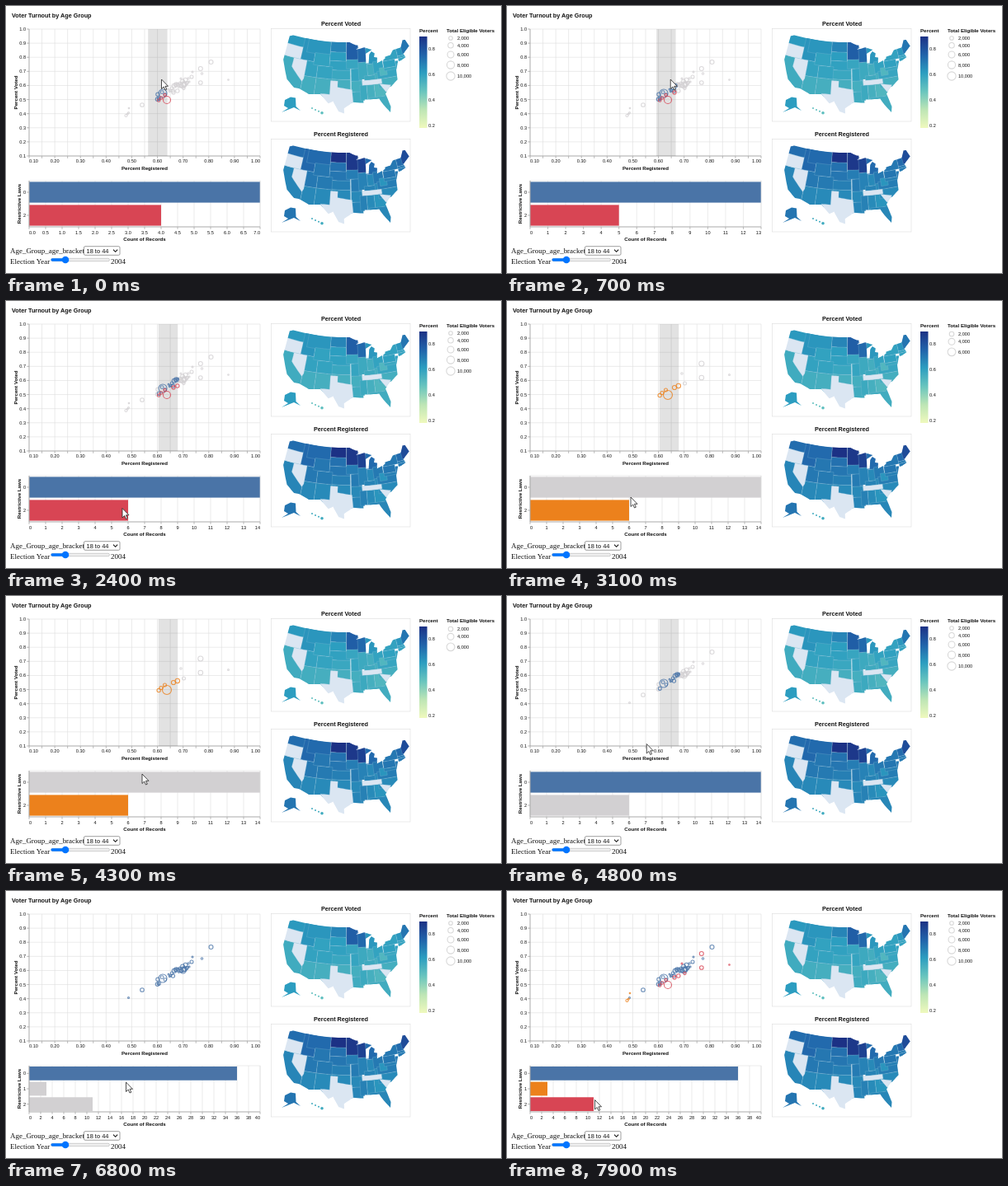
An HTML page that plays this animation: 600 px wide and 324 px high, repeating every 8 s.

```html
<!DOCTYPE html>
<html lang="en">
<head>
<meta charset="utf-8">
<title>Voter Turnout by Age Group</title>
<style>
html, body { margin: 0; width: 100%; height: 100%; overflow: hidden; background: white; }
svg { display: block; font: 5.6px "Liberation Sans", Arial, sans-serif; fill: #111; }
.title { font-size: 6.15px; font-weight: bold; }
.head { font-size: 7.26px; font-weight: bold; }
.form { font: 8.96px "Liberation Serif", Times, serif; }
.grid { stroke: #ddd; stroke-width: .6; fill: none; }
.tick { stroke: #888; stroke-width: .6; fill: none; }
.ring { fill: none; stroke-width: 1.1; }
.state { stroke: #8fbfd6; stroke-width: .25; }
.select { fill: white; stroke: #767676; stroke-width: .7; }
.track { fill: #efefef; stroke: #b2b2b2; stroke-width: .6; }
.chevron { fill: none; stroke: #111; stroke-width: 1.1; }
.brush { fill: #333; fill-opacity: .14; }
#cursor { fill: white; stroke: #222; stroke-width: .8; }
</style>
</head>
<body>
<svg id="stage" width="600" height="324" viewBox="0 0 600 324">
  <defs>
    <linearGradient id="ramp" x1="0" y1="1" x2="0" y2="0"></linearGradient>
    <clipPath id="country"><path id="coast"/></clipPath>
  </defs>
  <g id="fixed"></g>
  <g id="live"></g>
  <path id="cursor" d="M0 0V11.5L2.7 9 4.5 13 6.3 12.2 4.5 8.3H8Z"/>
</svg>
<script>
const $ = id => document.getElementById(id);
const LOOP = 8000, LEFT = 28, WIDTH = 280, TOP = 28, BOTTOM = 182, BARS = 212, BAR_HEIGHT = 56, BRUSH = 23.4;
const BLUE = '#4a74a7', ORANGE = '#ec811c', RED = '#d84554', GRAY = '#d2d0d2';

// ---- markup helpers
const text = (s, x, y, anchor = 'middle', cls = '', extra = '') =>
  `<text x="${x}" y="${y}" text-anchor="${anchor}" class="${cls}" ${extra}>${s}</text>`;
const upright = (s, x, y) => text(s, 0, 0, 'middle', 'title', `transform="translate(${x} ${y}) rotate(-90)"`);
const line = (d, cls) => `<path d="${d}" class="${cls}"/>`;
const rect = (x, y, w, h, attrs) => `<rect x="${x}" y="${y}" width="${w}" height="${h}" ${attrs}/>`;
const dot = (x, y, r, attrs) => `<circle cx="${x}" cy="${y}" r="${r}" ${attrs}/>`;
const flush = x => x <= LEFT + .1 ? 'start' : x >= LEFT + WIDTH - .1 ? 'end' : 'middle';

// ---- colour ramp
const ramp = [[239, 249, 189], [189, 229, 181], [105, 197, 190], [44, 158, 192], [33, 99, 170], [28, 49, 133]];
function shade(value) {
  const p = Math.max(0, Math.min(4.99, (value - .18) / .73 * 5)), i = Math.floor(p);
  return `rgb(${ramp[i].map((c, k) => Math.round(c + (ramp[i + 1][k] - c) * (p - i)))})`;
}
$('ramp').innerHTML = ramp.map((c, i) => `<stop offset="${i * 20}%" stop-color="rgb(${c})"/>`).join('');

// ---- map: Albers projection of longitude/latitude outlines
function project(lon, lat) {
  const n = .60285, rad = Math.PI / 180;
  const rho = Math.sqrt(1.35123 - 2 * n * Math.sin(lat * rad)) / n, a = n * (lon + 96) * rad;
  return [414 + 212 * rho * Math.sin(a), 83 - 212 * (1.28208 - rho * Math.cos(a))];
}
function outline(c) {
  const points = [], steps = 5;
  for (let i = 0; i < c.length; i += 2) {
    const j = (i + 2) % c.length;
    for (let k = 0; k < steps; k++) {
      const mix = m => c[i + m] + (c[j + m] - c[i + m]) * k / steps;
      points.push(project(mix(0), mix(1)).map(v => v.toFixed(1)).join(' '));
    }
  }
  return `M${points.join('L')}Z`;
}
const north = [-124.7,48.4, -123,49, -95,49.2, -92,48.2, -89.6,48, -92,46.7, -88,47.3, -84.5,46.3, -87.6,45.2,
  -87.8,42, -86.6,42, -86,44.8, -84.8,45.8, -83.4,45, -83.9,43.8, -82.5,43.5, -83,41.6, -79,42.8, -79,43.3,
  -76.4,43.6, -74.8,45, -71,45.2, -69.2,47.4, -68,47.2, -67,44.9];
const south = [-70.6,43, -70,41.7, -74,40.6, -75.3,38.3, -75.6,35.3, -78,33.9, -81.3,31.5, -80.1,27, -80.6,25.2,
  -82.7,28, -84,30.1, -89.5,30.3, -89.5,29.2, -94,29.6, -97.3,27.6, -97.2,25.9, -99.2,26.5, -101.5,29.8,
  -103.2,29, -106.5,31.8, -111,31.3, -114.8,32.5, -117.1,32.5, -120.6,34.6, -124.3,40.4];
$('coast').setAttribute('d', outline([...north, ...south]));

// Turnout rises to the north, apart from a few states; some have no data.
const missing = ['OR', 'NV', 'TX', 'TN', 'SC'];
const turnout = { ND: .68, MN: .78, WI: .75, ME: .72, WV: .53, GA: .53, IN: .56 };
const states = [];
function state(name, ...coords) {
  const lat = coords[1] / 2 + coords[5] / 2;
  const voted = turnout[name] || .57 + Math.max(0, lat - 37) * .007 + .015 * Math.sin(states.length * 2.4);
  const fills = [voted, voted + (name === 'ND' ? .25 : .11)].map(shade);
  states.push({ fills: missing.includes(name) ? ['#dbe6f2', '#dbe6f2'] : fills, d: outline(coords) });
}
// States stacked from south to north between two meridians; later ones cover earlier ones.
function column(names, west, east, ...cuts) {
  names.split(' ').forEach((name, i) =>
    state(name, west, cuts[i], east, cuts[i], east, cuts[i + 1], west, cuts[i + 1]));
}
column('CA OR WA', -125, -114.5, 32, 42, 46, 49.5);
column('ID', -117, -111, 42, 49.2);
column('MT', -115, -104, 44.7, 49.2);
column('AZ UT', -114.5, -109, 31, 37, 42);
column('OK KS NE', -104, -94.8, 33.7, 37, 40, 43);
column('NM CO', -109, -102.5, 31, 37, 41);
column('WY', -111, -104, 41, 45);
column('SD ND', -104, -96.6, 43, 45.9, 49.5);
column('IA MN', -96.5, -91, 40.5, 43.5, 49.5);
column('LA AR MO', -94.5, -90, 29, 33, 36.5, 40.5);
column('IL WI', -91.3, -87.4, 36.9, 42.5, 47.4);
column('MS', -91, -88.3, 30, 35);
column('AL', -88.3, -85.3, 30, 35);
column('GA', -85.3, -80.8, 30.7, 35);
column('FL', -87.6, -79, 24, 30.8);
column('IN MI', -87.5, -82, 38, 41.75, 47);
column('KY OH', -84.8, -80.5, 36.5, 38.5, 42.3);
column('KY', -89, -84.5, 36.5, 38);
column('NC VA', -83.5, -75, 33.5, 36.5, 39);
column('WV', -82.3, -79.3, 37.5, 40);
column('MD PA', -80.3, -75, 38.8, 39.7, 42);
column('NY', -80, -73.4, 42, 45.2);
column('NJ', -75, -73.8, 38.8, 41.3);
column('CT MA VT', -73.4, -69.8, 41, 42, 42.7, 45.4);
column('ME', -71, -66, 43.1, 48);
column('TN', -90, -82, 35, 36.5);
state('SC', -83.2, 35, -78.6, 34, -81, 32);
state('NV', -120, 42, -114, 42, -114, 36, -114.6, 35, -120, 39);
state('TX', -106.6, 32, -103, 32, -103, 36.5, -100, 36.5, -100, 34.5, -94.2, 33.7, -93.8, 29, -97, 25, -104, 28);

function map(title, dy, which) {
  const path = s => `<path d="${s.d}" fill="${s.fills[which]}" class="state"/>`;
  const island = i => dot(371 + i * 4, 124 + i * 1.9, i < 3 ? 1 : 1.8, `fill="${shade(.5 + which * .07)}"`);
  return text(title, 406, 23.5 + dy, 'middle', 'head') + `<g transform="translate(0 ${dy})">` +
    rect(321.5, 27.5, 168.5, 112.5, 'class="grid"') +
    `<g clip-path="url(#country)">${states.map(path).join('')}</g>` +
    `<path fill="${shade(.62 + which * .1)}" d="M334 129L342 124 337 121 338 114 345 110.5 351 111.5 351.5 122 357 127 349 123Z"/>` +
    [0, 1, 2, 3].map(island).join('') + '</g>';
}

// ---- everything that never changes
function drawFixed() {
  let s = text('Voter Turnout by Age Group', 7, 13.5, 'start', 'head');
  for (let i = 0; i <= 18; i++) {
    const x = LEFT + WIDTH * i / 18;
    s += line(`M${x} ${TOP}V${BOTTOM}`, 'grid') + line(`M${x} ${BOTTOM}v2.8`, 'tick');
    if (i % 2 === 0) s += text((.1 + i * .05).toFixed(2), x, 190.3, flush(x));
  }
  for (let i = 0; i <= 9; i++) {
    const y = BOTTOM - (BOTTOM - TOP) * i / 9;
    s += line(`M${LEFT} ${y}h${WIDTH}`, 'grid') + line(`M${LEFT} ${y}h-2.8`, 'tick') +
      text((.1 + i * .1).toFixed(1), 24, y + 2, 'end');
  }
  s += line(`M${LEFT} ${TOP}V${BOTTOM}H${LEFT + WIDTH}`, 'tick') +
    text('Percent Registered', 168, 198.8, 'middle', 'title') + upright('Percent Voted', 13.5, 105) +
    text('Count of Records', 168, 284.8, 'middle', 'title') + upright('Restrictive Laws', 18, 240) +
    map('Percent Voted', 0, 0) + map('Percent Registered', 134, 1) +
    text('Percent', 501, 32.3, 'start', 'title') + rect(501, 37, 9.5, 111, 'fill="url(#ramp)"') +
    ['0.8', '0.6', '0.4', '0.2'].map((v, i) => text(v, 512, 54 + i * 31, 'start')).join('') +
    text('Total Eligible Voters', 534, 32.3, 'start', 'title') +
    text('Age_Group_age_bracket', 5, 300, 'start', 'form') +
    rect(94.5, 291.7, 43.5, 10.6, 'rx="1.4" class="select"') +
    text('18 to 44', 97.5, 299.7, 'start', '', 'font-size="7.46"') +
    line('M130 295.7l2.6 2.6 2.6-2.6', 'chevron') +
    text('Election Year', 5, 313, 'start', 'form') + text('2004', 127, 313, 'start', 'form') +
    rect(54.5, 306.3, 71, 3.4, 'rx="1.7" class="track"') +
    rect(54.5, 306.2, 17, 3.6, 'rx="1.8" fill="#0075ff"') + dot(72, 308, 4.3, 'fill="#0075ff"');
  $('fixed').innerHTML = s;
}

// ---- scatter points per number of laws: x, y, radius
const cluster = (count, x0, gap) => Array.from({ length: count }, (_, i) => {
  const x = x0 + i * gap;
  return [x, 107 - (x - 190) * .52 + 3 * Math.sin(x * 7.3), 1.8 + .9 * Math.sin(x * 5)];
});
const points = [
  [...cluster(3, 183.6, .4), ...cluster(3, 185.3, 3.8), ...cluster(6, 197, 1.35), ...cluster(4, 205.5, .85),
   ...cluster(12, 209.5, 1.15), [190, 106, 5], [214.5, 96, 4], [148.5, 129.5, 1], [165, 120, 2.3],
   [225, 86, 2], [226, 80, 1], [237.5, 82, 1.2], [248.5, 68, 2.5]],
  [[145.5, 133, 1.5], [147.3, 131, 1], [149, 124, .8]],
  [[185.2, 114.5, 1.8], [188, 111.5, 1.7], [192.5, 108, 1.6], [195, 114, 4.5], [203, 105, 2.1], [207.8, 103, 2.2],
   [212, 88, 1], [215.5, 100, 1.6], [235.8, 76, 2.5], [235.8, 93, 2.3], [269.5, 89.5, .8]]
];

// ---- pointer moves: start time, end time, x, y
const moves = [[0, 900, 201, 89], [900, 1900, 141, 251.5], [2700, 3100, 150, 238], [3200, 3900, 165, 216],
  [4600, 5000, 173.5, 143], [5800, 6500, 145.5, 232], [6800, 7100, 219, 232], [7600, 7900, 106.5, 253.5]];
function pointer(t) {
  let x = 188.5, y = 89;
  for (const [start, end, toX, toY] of moves) {
    const p = Math.max(0, Math.min(1, (t - start) / (end - start)));
    x += (toX - x) * p;
    y += (toY - y) * p;
  }
  return [x, y];
}

function draw(t) {
  const picked = t < 2500 || t >= 7300 ? null : t < 4400 ? 2 : 0;
  const brush = t < 5300 ? 172.2 + 12.6 * Math.pow(Math.min(1, t / 900), 1.35) : null;
  const inside = p => brush === null || (p[0] >= brush && p[0] <= brush + BRUSH);
  const chosen = law => picked === null || picked === law;
  const colors = [BLUE, ORANGE, picked === 2 ? ORANGE : RED];
  const grow = picked === 2 ? 1.22 : 1;
  let s = '';

  if (brush !== null) s += rect(brush, TOP, BRUSH, BOTTOM - TOP, 'class="brush"');
  for (const hit of [false, true])
    points.forEach((list, law) => {
      if (chosen(law)) for (const p of list) if (inside(p) === hit)
        s += dot(p[0], p[1], p[2] * grow, `class="ring" opacity=".8" stroke="${hit ? colors[law] : GRAY}"`);
    });

  const rows = points.map((list, law) => ({ law, count: list.filter(inside).length })).filter(r => r.count);
  const most = Math.max(...rows.map(r => r.count));
  const domain = most > 20 ? 40 : most, step = most > 20 ? 2 : most < 10 ? .5 : 1;
  for (let v = 0; v <= domain; v += step) {
    const x = LEFT + WIDTH * v / domain;
    s += line(`M${x} ${BARS}v${BAR_HEIGHT}`, 'grid') + line(`M${x} ${BARS + BAR_HEIGHT}v2.8`, 'tick') +
      text(step < 1 ? v.toFixed(1) : v, x, 276.6, flush(x));
  }
  const band = BAR_HEIGHT / rows.length;
  rows.forEach(({ law, count }, i) => {
    const y = BARS + band * i;
    s += rect(LEFT, y + band * .05, WIDTH * count / domain, band * .9, `fill="${chosen(law) ? colors[law] : GRAY}"`) +
      line(`M${LEFT} ${y + band / 2}h-2.8`, 'tick') + text(law, 24, y + band / 2 + 2, 'end');
  });
  s += rect(LEFT, BARS, WIDTH, BAR_HEIGHT, 'class="grid"') +
    line(`M${LEFT} ${BARS}v${BAR_HEIGHT}h${WIDTH}`, 'tick');

  const heights = picked === 2 ? [40, 49.3, 61.8] : [39, 47.8, 59, 71.5, 85];
  heights.forEach((y, i) => {
    s += dot(539, y, Math.sqrt(i + 1) * 2.3 * grow, 'class="ring" stroke="#d8d8d8"') +
      text(`${2 * i + 2},000`, 547, y + 2, 'start');
  });
  $('live').innerHTML = s;
  $('cursor').setAttribute('transform', `translate(${pointer(t)})`);
}

// The screen updates ten times a second.
let shown = -1;
function tick() {
  const t = Math.floor(performance.now() % LOOP / 100) * 100;
  if (t !== shown) draw(shown = t);
  requestAnimationFrame(tick);
}
drawFixed();
tick();
</script>
</body>
</html>
```
